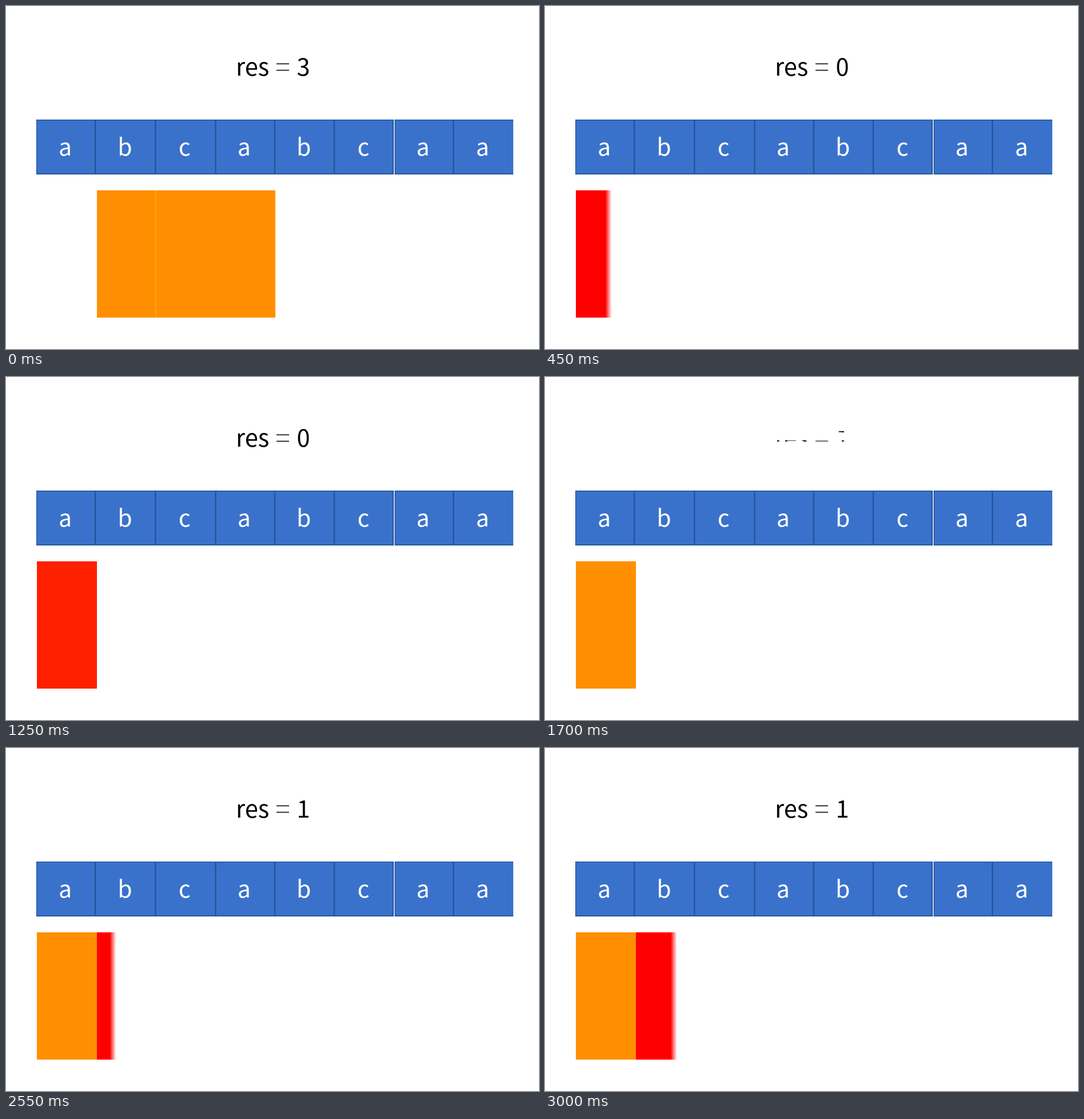
Animation of 932x601 px, one loop 3.05 s. Source, as an HTML page with a canvas:

```html
<!DOCTYPE html>
<html lang="en">
<head>
<meta charset="utf-8">
<title>Sliding window</title>
<style>
  html, body { margin: 0; width: 100%; height: 100%; overflow: hidden; background: #fff; }
  canvas { display: block; }
</style>
</head>
<body>
<canvas id="stage" width="932" height="601"></canvas>
<script>
const ctx = document.getElementById("stage").getContext("2d");

const LOOP = 3050, STEP = 50;
const HOLDS = [[0, 100], [200, 350], [450, 600], [1100, 1200], [1700, 1800]];
const FONT = '"Noto Sans CJK SC", "Noto Sans", sans-serif';
const RED = "#ff0000", ORANGE = "#ff8f00", BLUE = "#3a72cb", EDGE = "#21569c";
const BAR_TOP = 323, BAR_HEIGHT = 223;
const SOFT = 11;
const STRIPS = 19;

const clamp = v => Math.max(0, Math.min(1, v));
const progress = (t, from, to) => clamp((t - from) / (to - from));

function rect(color, x, y, w, h) {
  ctx.fillStyle = color;
  ctx.fillRect(x, y, w, h);
}

function label(text, x, y, size, color, align = "center") {
  ctx.font = `${size}px ${FONT}`;
  ctx.textAlign = align;
  ctx.fillStyle = color;
  ctx.fillText(text, x, y);
}

function bar(color, left, right) {
  rect(color, left, BAR_TOP, right - left, BAR_HEIGHT);
}

// Bar growing to the right behind a soft edge
function wipe(left, right, front) {
  if (front <= left) return;
  const fade = ctx.createLinearGradient(front - SOFT, 0, front, 0);
  fade.addColorStop(0, RED);
  fade.addColorStop(1, "rgba(255,0,0,0)");
  bar(fade, left, Math.min(right, front));
}

function drawCells() {
  rect(BLUE, 53, 199, 834, 96);
  rect(EDGE, 53, 199, 834, 1.5);
  rect(EDGE, 53, 293.2, 834, 2);
  rect(EDGE, 53, 199, 1.3, 96);
  for (const x of [156, 261.3, 366.5, 470, 574, 677, 680, 782.3]) {
    rect(EDGE, x - 1.2, 199, 2.4, 96);
  }
  rect("#fff", 678, 199, 1.5, 96);
  [..."abcabcaa"].forEach((c, i) => label(c, 103.6 + i * 104.25, 262, 41, "#fff"));
}

function drawResult(n) {
  label("res", 402, 122, 41.5, "#000", "left");
  rect("#333", 473, 100.3, 22, 2);
  rect("#333", 473, 111.6, 22, 2);
  label(n, 520, 122, 41.5, "#000");
}

// Shows the result through scattered horizontal strips
function drawStrips(n, amount) {
  const shown = Math.floor(amount * STRIPS + 0.01);
  if (!shown) return;
  ctx.save();
  ctx.beginPath();
  for (let i = 0; i < STRIPS; i++) {
    if ((i * 12 + 2) % STRIPS < shown) ctx.rect(395, 89 + i * 2, 145, 2);
  }
  ctx.clip();
  drawResult(n);
  ctx.restore();
}

function drawWindow(t) {
  if (t < 100) {
    bar(ORANGE, 159, 471);
    rect("#ffa200", 260.5, BAR_TOP, 2.5, BAR_HEIGHT);
  } else if (t < 150) {
    bar(ORANGE, 366, 678);
  } else if (t < 1150) {
    wipe(54, 159, 92.5 + 0.0805 * (t - 150));
  } else {
    const green = Math.round(143 * progress(t, 1150, 1600));
    bar(`rgb(255,${green},0)`, 54, 159);
    wipe(159, 264, 192.5 + 0.085 * (t - 2550));
  }
}

function drawText(t) {
  if (t < 150) drawResult("3");
  else if (t < 1350) drawResult("0");
  else if (t < 1650) drawStrips("0", 1 - progress(t, 1350, 1650));
  else if (t < 2120) drawStrips("1", progress(t, 1650, 2120));
  else drawResult("1");
}

function stepped(time) {
  const t = Math.floor((time % LOOP) / STEP) * STEP;
  const hold = HOLDS.find(([from, to]) => t >= from && t < to);
  return hold ? hold[0] : t;
}

let start;
function frame(now) {
  start ??= now;
  const t = stepped(now - start);
  rect("#fff", 0, 0, 932, 601);
  drawCells();
  drawText(t);
  drawWindow(t);
  requestAnimationFrame(frame);
}
requestAnimationFrame(frame);
</script>
</body>
</html>
```
